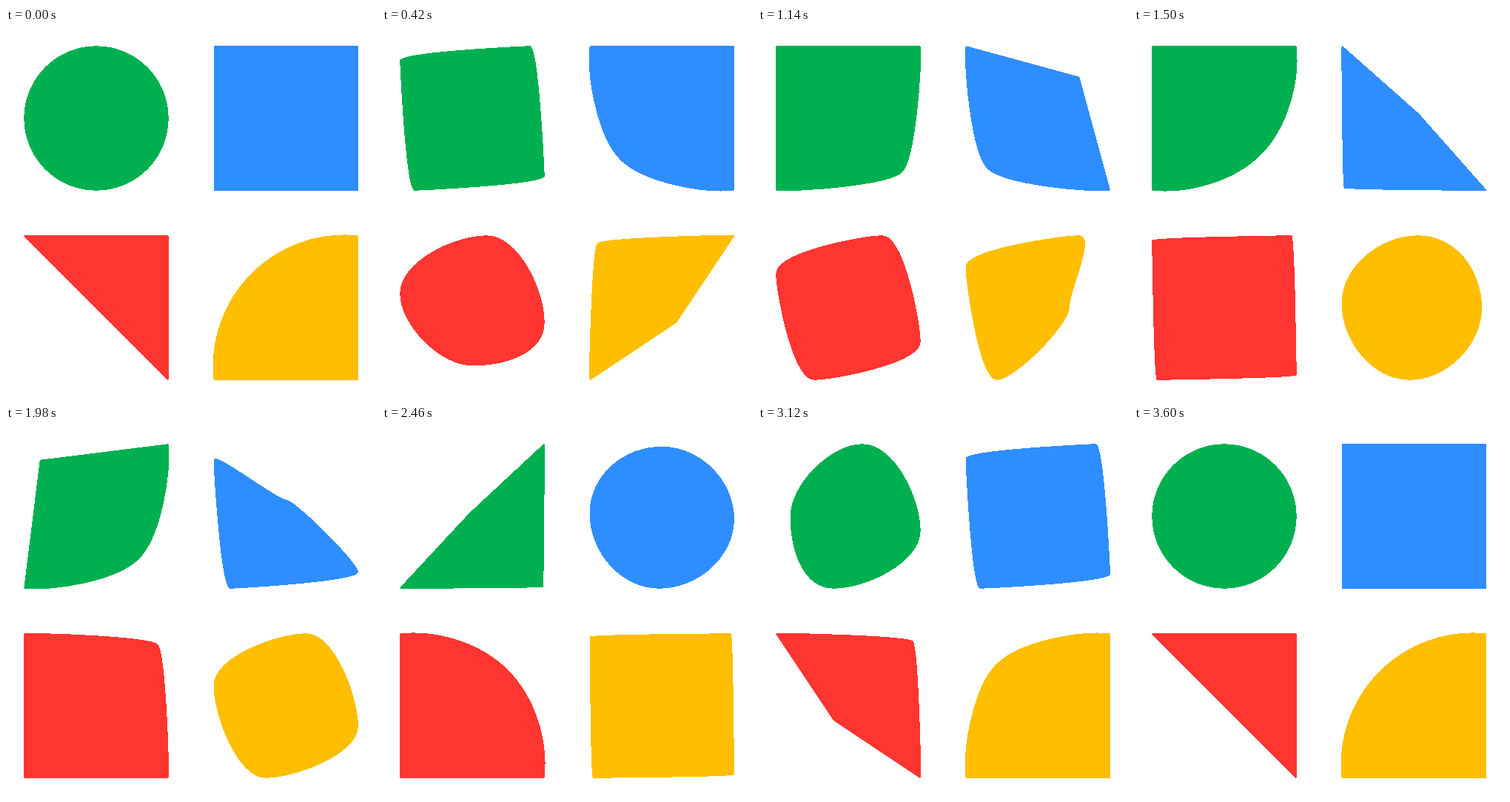
An HTML page that plays this animation: 500x500 px, repeating every 3.63 s.

```html
<!DOCTYPE html>
<html>
<head>
<meta charset="utf-8">
<style>
  html, body { margin: 0; width: 100%; height: 100%; overflow: hidden; background: #fff; }
  svg { display: block; width: 500px; height: 500px; }
  path { stroke-width: 2; stroke-linejoin: round; shape-rendering: crispEdges; }
</style>
</head>
<body>
<svg viewBox="0 0 500 500"></svg>
<script>
const LOOP = 3630, STEP = 30, STEPS_PER_MORPH = 30, HALF = 96.7;

// Each shape is four points in a -1..1 box: [x, y, inX, inY, outX, outY], handles relative.
const corner = (x, y) => [x, y, 0, 0, 0, 0];
const K = 0.5523; // handle of a 90° arc, radius 1

// The quarter's arc is centred slightly inside its corner, so it spans a little over 90°.
const INSET = 0.18;
const radius = Math.hypot(2 - INSET, INSET);
const lean = Math.asin(INSET / radius);
const handle = 4 / 3 * radius * Math.tan((Math.PI / 4 + lean) / 4);
const [hx, hy] = [handle * Math.sin(lean), handle * Math.cos(lean)];
const mid = INSET - 1 + radius * Math.SQRT1_2, hm = handle * Math.SQRT1_2;

// launch: first control value of the easing that leaves the shape
const shapes = [
  { // circle
    launch: 0.3,
    points: [[0, -1, -K, 0, K, 0], [1, 0, 0, -K, 0, K], [0, 1, K, 0, -K, 0], [-1, 0, 0, K, 0, -K]]
  },
  { // square
    launch: 0.3,
    points: [corner(1, -1), corner(1, 1), corner(-1, 1), corner(-1, -1)]
  },
  { // quarter disc
    launch: 0.345,
    points: [[1, -1, 0, 0, hx, hy], [mid, mid, hm, -hm, -hm, hm], [-1, 1, hy, hx, 0, 0], corner(-1, -1)]
  },
  { // triangle with a fourth point halfway along its long side
    launch: 0.345,
    points: [corner(1, -1), corner(1, 1), corner(-1, 1), corner(0, 0)]
  }
];

// Each tile runs the same cycle, a number of turns ahead and turned by as many right angles.
const tiles = [
  { x: 122, y: 122, color: '#00b050', turns: 0 },
  { x: 378.25, y: 122, color: '#2e8eff', turns: 1 },
  { x: 378.25, y: 378, color: '#ffbe00', turns: 2 },
  { x: 122, y: 378, color: '#ff3531', turns: 3 }
];

const svg = document.querySelector('svg');
for (const tile of tiles) {
  tile.path = document.createElementNS(svg.namespaceURI, 'path');
  tile.path.setAttribute('fill', tile.color);
  tile.path.setAttribute('stroke', tile.color);
  svg.append(tile.path);
}

// cubic-bezier(launch, 0, .1, 1)
function ease(x, launch) {
  let lo = 0, hi = 1;
  for (let i = 0; i < 30; i++) {
    const s = (lo + hi) / 2, r = 1 - s;
    if (3 * r * r * s * launch + 3 * r * s * s * 0.1 + s * s * s < x) lo = s; else hi = s;
  }
  return lo * lo * (3 - 2 * lo);
}

function outline(tile, phase, t) {
  const from = shapes[(phase + tile.turns) % 4];
  const to = shapes[(phase + tile.turns + 1) % 4];
  const p = ease(t, from.launch);
  const points = from.points.map((a, i) => a.map((v, j) => v + (to.points[i][j] - v) * p));
  const place = (x, y) => {
    for (let i = 0; i < tile.turns; i++) [x, y] = [-y, x];
    return (tile.x + x * HALF).toFixed(2) + ' ' + (tile.y + y * HALF).toFixed(2);
  };
  let d = 'M' + place(points[0][0], points[0][1]);
  points.forEach(([x, y, , , ox, oy], i) => {
    const [nx, ny, ix, iy] = points[(i + 1) % 4];
    d += `C${place(x + ox, y + oy)} ${place(nx + ix, ny + iy)} ${place(nx, ny)}`;
  });
  return d + 'Z';
}

const start = performance.now();

function draw() {
  const step = Math.floor((performance.now() - start) % LOOP / STEP);
  const phase = Math.floor(step / STEPS_PER_MORPH);
  const t = step % STEPS_PER_MORPH / STEPS_PER_MORPH;
  for (const tile of tiles) tile.path.setAttribute('d', outline(tile, phase, t));
  requestAnimationFrame(draw);
}
draw();
</script>
</body>
</html>
```
